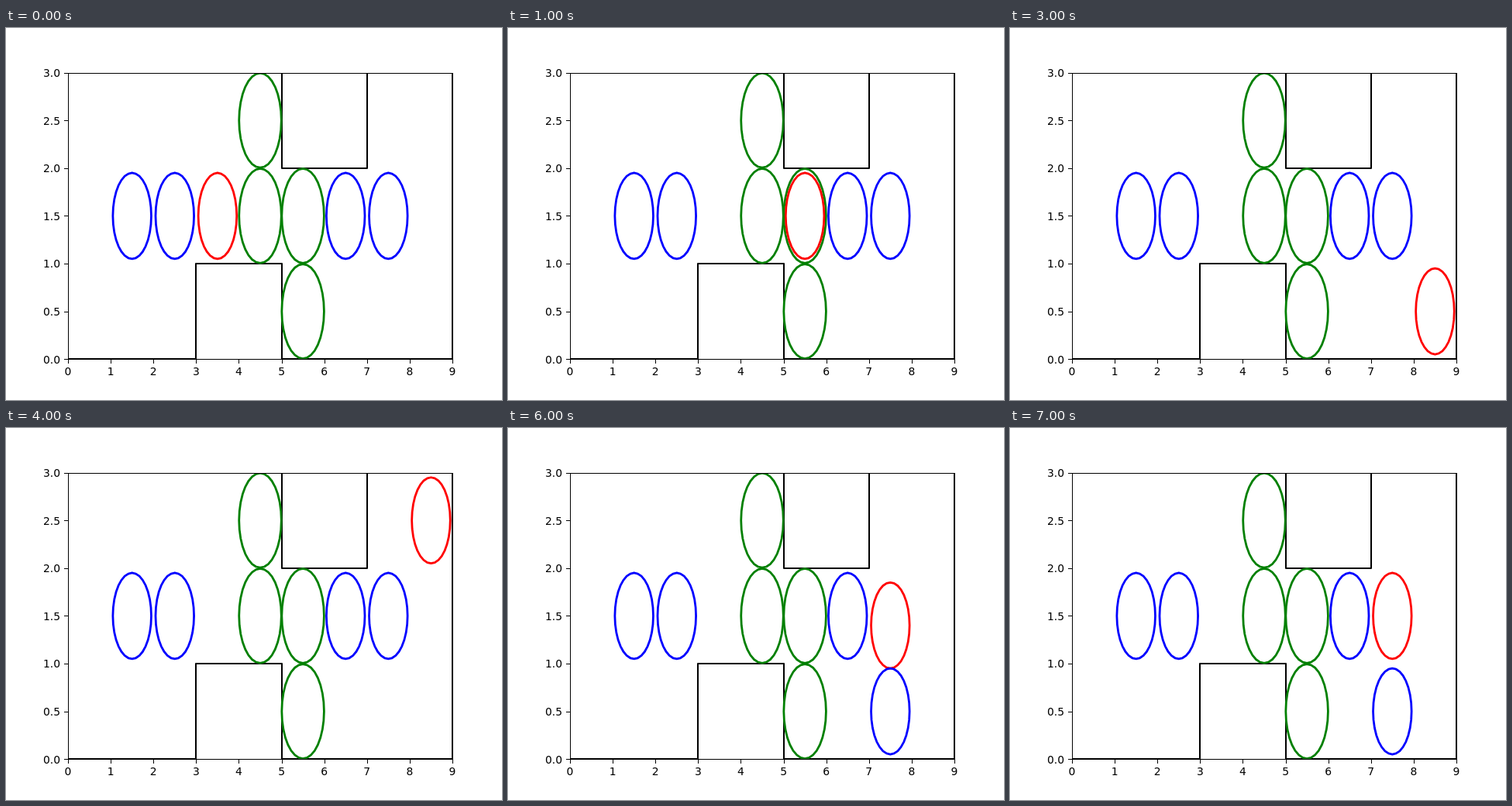
These frames come from a looping animation (640x480 px, 8000 ms). An HTML page:

```html
<!DOCTYPE html>
<html lang="en">
<head>
<meta charset="utf-8">
<title>Sliding disc</title>
<style>
  html, body { margin: 0; height: 100%; overflow: hidden; background: #fff; }
  svg { display: block; }
  text { font: 13.89px "DejaVu Sans", sans-serif; }
  .disc { fill: none; stroke-width: 2.78; stroke-linejoin: round; }
  .wall { fill: none; stroke: #000; stroke-width: 2; stroke-linejoin: round; }
  .axis { fill: none; stroke: #000; stroke-width: 1; }
</style>
</head>
<body>
<svg width="640" height="480" viewBox="0 0 640 480">
  <clipPath id="plot"><rect x="80" y="58" width="497" height="370"/></clipPath>
  <g id="scene" clip-path="url(#plot)"></g>
  <g id="axes"><rect class="axis" x="80.5" y="58.5" width="496" height="369"/></g>
</svg>
<script>
const scene = document.getElementById('scene');
const axes = document.getElementById('axes');
const px = x => 80 + x * 496 / 9;
const py = y => 427.2 - y * 123.2;
const SEGMENTS = 32, SMALL = 0.45, LARGE = 0.495;

function add(parent, tag, attrs, text = '') {
  const el = document.createElementNS('http://www.w3.org/2000/svg', tag);
  for (const key in attrs) el.setAttribute(key, attrs[key]);
  el.textContent = text;
  return parent.appendChild(el);
}

function outline(x, y, r) {
  return Array.from({ length: SEGMENTS }, (_, i) => {
    const a = i * 2 * Math.PI / SEGMENTS;
    return [px(x + r * Math.cos(a)).toFixed(2), py(y + r * Math.sin(a)).toFixed(2)];
  }).join(' ');
}

const disc = (x, y, r, stroke) =>
  add(scene, 'polygon', { class: 'disc', stroke, points: outline(x, y, r) });
const move = (el, x, y) => el.setAttribute('points', outline(x, y, SMALL));

// Room outline from the lower left corner: alternating horizontal and vertical runs.
const runs = [3, 1, 5, 0, 9, 3, 7, 2, 5, 3, 0]
  .map((v, i) => i % 2 ? 'V' + Math.round(py(v)) : 'H' + Math.round(px(v)));
add(scene, 'path', { class: 'wall', d: `M80 427${runs.join('')}Z` });

for (let i = 0; i < 4; i++) disc(4.5 + (i >> 1), 2.5 - (i + 1 >> 1), LARGE, '#008000');
const player = disc(3.5, 1.5, SMALL, '#f00');
for (const x of [1.5, 2.5, 6.5]) disc(x, 1.5, SMALL, '#00f');
const pushed = disc(7.5, 1.5, SMALL, '#00f');

for (let i = 0; i <= 9; i++) {
  const x = px(i);
  add(axes, 'path', { class: 'axis', d: `M${Math.round(x) + 0.5} 428v5` });
  add(axes, 'text', { x, y: 448, 'text-anchor': 'middle' }, i);
}
for (let v = 0; v <= 3; v += 0.5) {
  const y = py(v);
  add(axes, 'path', { class: 'axis', d: `M75 ${Math.round(y) + 0.5}h5` });
  add(axes, 'text', { x: 70, y: Math.round(y + 5.4), 'text-anchor': 'end' }, v.toFixed(1));
}

// One stop per second: slide until blocked, then push the last disc down.
const stops = [[3.5, 1.5], [5.5, 1.5], [5.5, 0.5], [8.5, 0.5],
               [8.5, 2.5], [7.5, 2.4], [7.5, 1.4], [7.5, 1.5]];

function draw() {
  const step = Math.floor(performance.now() / 1000) % stops.length;
  move(player, ...stops[step]);
  move(pushed, 7.5, step < 6 ? 1.5 : 0.5);
  requestAnimationFrame(draw);
}
draw();
</script>
</body>
</html>
```
